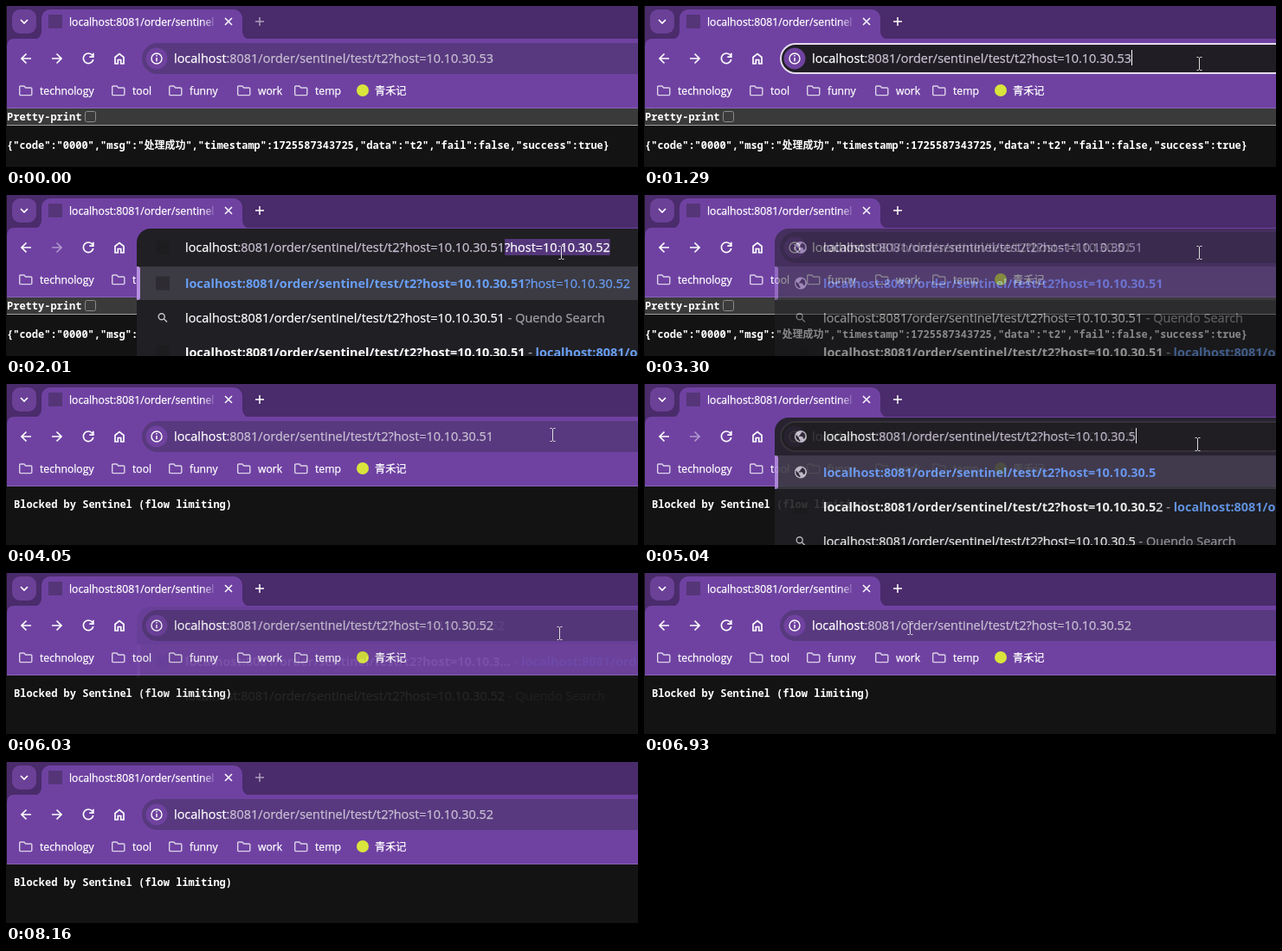
An HTML page that plays this animation: 730x187 px, repeating every 8.22 s.

```html
<!DOCTYPE html>
<html lang="en">
<head>
<meta charset="utf-8">
<title>Browser address bar</title>
<style>
  html, body { margin: 0; width: 100%; height: 100%; overflow: hidden; background: #131313; }
  svg { display: block; width: 730px; height: 187px; }
  text { white-space: pre; --ink: #fff; font: 14.45px "Open Sans", "Noto Sans", sans-serif; }
  text, tspan { fill: var(--ink); stroke: var(--ink); stroke-width: .25; }
  .small { font-size: 12.2px; }
  .cjk { font-family: "Noto Sans CJK SC", "Noto Sans CJK", sans-serif; }
  .mono { font: 700 12px "Noto Sans Mono", "Noto Sans CJK SC", monospace; stroke: none; }
  .line { fill: none; stroke: #fff; stroke-width: 1.7; }
  .path { --ink: #c9c0d4; }
  .muted { --ink: #a3a0a8; }
  .bold { font-weight: 700; stroke: none; }
  .blue { --ink: #699ff5; }
</style>
</head>
<body>
<svg viewBox="0 0 730 187">
  <defs>
    <linearGradient id="titleFade" gradientUnits="userSpaceOnUse" x1="226" x2="243" y1="0" y2="0">
      <stop stop-color="#fff"/><stop offset="1" stop-color="#fff" stop-opacity="0"/>
    </linearGradient>
    <g id="folder"><path class="line" style="stroke:#ddd3e8;stroke-width:1.4" d="M1.7 1h4.2l1.8 2h6.1q1 0 1 1v6.6q0 1-1 1H1.7q-1 0-1-1V2q0-1 1-1z"/></g>
    <g id="tile"><rect x="-8" y="-8" width="16" height="16" fill="#19181b" opacity=".4"/></g>
    <g id="globe">
      <circle r="7" fill="#c9c7cc"/>
      <path fill="#2a282e" d="M-5.4-2L-1.8 1.6v1.3l1.2 1.2v1.6C-4 5.3-6.4 1.6-5.4-2zM1.2-5.4v1.1L-.6-2.8v1.5h-1.5V0h4.2l.8 2.2 1.5.3C6.5-.8 5-4.3 1.2-5.4z"/>
    </g>
    <g id="search" fill="none" stroke="#c9c7cc" stroke-width="1.4">
      <circle cx="-1.3" cy="-1.3" r="3.5"/><path d="M1.3 1.3L5 5"/>
    </g>
  </defs>

  <!-- tab strip -->
  <rect x="1" width="729" height="60" fill="#4a2b6b"/>
  <rect x="7" y="4" width="28" height="28" rx="9" fill="#6b4097"/>
  <path class="line" d="M17 16l4 4 4-4"/>
  <path fill="#6f42a2" d="M32 39a9 9 0 0 0 9-9V14a10 10 0 0 1 10-10H263a10 10 0 0 1 10 10V30a9 9 0 0 0 9 9z"/>
  <rect id="favicon" x="49" y="10" width="16" height="16" fill="#553578"/>
  <path id="spinner" class="line" d="M57 11a7 7 0 1 1-7 7"/>
  <text x="73" y="22.5" style="font-size:12.2px;--ink:url(#titleFade)">localhost:8081/order/sentinel</text>
  <path class="line" style="stroke-width:1.5" d="M253 14l8 8m0-8l-8 8"/>
  <path id="plus" class="line" style="stroke-width:1.5" d="M293 13v10m-5-5h10"/>

  <!-- toolbar -->
  <path fill="#6f42a2" d="M1 119V47q0-9 9-9H730V119z"/>
  <rect x="1" y="118" width="729" height="1" fill="#8b62b9"/>
  <circle id="hover" cx="95" cy="61" r="15" fill="#8a63b5"/>
  <path class="line" d="M29 61H18m5.5-5.5L18 61l5.5 5.5"/>
  <path id="forward" class="line" d="M53 61h11m-5.5-5.5L64 61l-5.5 5.5"/>
  <path id="reload" class="line" d="M99.9 57.5A5.8 5.8 0 1 0 100.8 62M100.8 54.8v4.4h-4.5"/>
  <path id="stop" class="line" d="M90 56l10 10m0-10L90 66"/>
  <path class="line" d="M126 59.5v7.5h3.3V62.5h3.4v4.500h3.300V59.5l-5-4z"/>
  <rect x="157" y="43" width="620" height="36" rx="18" fill="#58397f"/>
  <rect id="focus" x="158" y="44" width="620" height="34" rx="17" fill="#201e24" stroke="#e6dcf1" stroke-width="2"/>
  <circle cx="174" cy="61" r="12.5" fill="#6f429f"/>
  <circle class="line" cx="174" cy="61" r="6" style="stroke-width:1.4"/>
  <path class="line" style="stroke-width:1.5" d="M174 60v4.3m0-7.3v1.5"/>
  <text id="url" x="194" y="66"></text>
  <rect id="caret" y="51" width="1" height="18" fill="#fff"/>
  <g id="bookmarks"></g>
  <circle cx="412" cy="98" r="7" fill="#d9e53c"/>
  <text class="small cjk" x="426" y="103">青禾记</text>

  <!-- page -->
  <rect y="119" width="730" height="68" fill="#131313"/>
  <g id="json">
    <rect x="1" y="119" width="729" height="19" fill="#3a3a3a"/>
    <rect x="1" y="138" width="729" height="1" fill="#a0a0a0"/>
    <text class="mono" x="1" y="133">Pretty-print</text>
    <rect x="91.5" y="122.5" width="12" height="12" rx="2" fill="#3b3b3b" stroke="#8b8b8b"/>
    <text class="mono" x="1" y="166">{"code":"0000","msg":"处理成功","timestamp":1725587343725,"data":"t2","fail":false,"success":true}</text>
  </g>
  <text id="blocked" class="mono" x="9" y="144">Blocked by Sentinel (flow limiting)</text>

  <!-- suggestions -->
  <g id="popup">
    <rect id="sheet" x="151" y="39" width="620" rx="16" fill="#201f23"/>
    <rect x="151" y="83" width="579" height="39" fill="#3c3a43"/>
    <path fill="#b58ee0" d="M151 83h1q3 0 3 3v33q0 3-3 3h-1z"/>
    <rect id="selection" y="51" height="19" fill="#54377b"/>
    <use id="inputIcon" x="181" y="61"/>
    <text id="input" x="207" y="66"></text>
    <rect id="inputCaret" y="51" width="1" height="18" fill="#fff"/>
    <g id="rows"></g>
  </g>

  <path id="beam" class="line" style="stroke:#dcdcdc;stroke-width:1" d="M-3-7.500h2L0-6.500 1-7.500h2M0-7V7M-3 7.500h2L0 6.500 1 7.500h2"/>
  <path id="arrow" fill="#fff" stroke="#222" stroke-width=".8" d="M0 0v15l3.5-3.3 2.3 5.3 2.3-1-2.3-5.2h4.7z"/>
</svg>
<script>
const LOOP = 8220;
const HOST = 'localhost';
const PATH = ':8081/order/sentinel/test/t2';
const query = end => '?host=10.10.30.' + end;
const address = end => HOST + PATH + query(end);
const $ = id => document.getElementById(id);

const span = (text, cls = '') => `<tspan class="${cls}">${text}</tspan>`;
const addressSpans = end => span(HOST) + span(PATH + query(end), 'path');
const link = text => span(text, 'bold blue');
const dash = span(' - ', 'muted');
const searchRow = end => ['search', span(address(end)) + span(' - Quendo Search', 'muted')];
const historyRow = (...title) => ['tile', title.join('') + dash + link(address('52'))];

const partial = {
  end: '5', icon: 'globe', height: 200,
  rows: [['globe', link(address('5'))],
         historyRow(span(address('5'), 'bold'), span('2')),
         searchRow('5')]
};
const completed = {
  end: '51', tail: query('52'), icon: 'tile', height: 200,
  rows: [['tile', link(address('51')) + span(query('52'), 'blue')],
         searchRow('51'),
         historyRow(span(address('51'), 'bold'))]
};
const trimmed = {
  ...completed, tail: '', icon: 'globe',
  rows: [['globe', link(address('51'))], ...completed.rows.slice(1)]
};
const retyped = {
  end: '52', icon: 'tile', height: 132,
  rows: [historyRow(span(address('52').slice(0, -4) + '...', 'bold')), searchRow('52')]
};

const popupStates = [[0, partial], [2010, completed], [2610, trimmed], [4980, partial], [5280, retyped]];
const urls = [[0, '53'], [3300, '51'], [6000, '52']];
const mouse = [
  [90, 704, 51], [300, 582, 68], [450, 606, 62], [1200, 606, 62], [1290, 641, 67],
  [3840, 641, 67], [4050, 631, 59], [4200, 631, 59], [4410, 639, 70],
  [6450, 639, 70], [7290, 93, 60], [8070, 93, 60], [8160, 50, 187]
];

const between = (t, a, b) => t >= a && t < b;
const ramp = (t, a, b) => Math.min(1, Math.max(0, (t - a) / (b - a)));
const latest = (list, t) => list.reduce((value, [at, v]) => t >= at ? v : value, null);
const show = (id, on) => { $(id).style.display = on ? '' : 'none'; };

function mouseAt(t) {
  const next = mouse.findIndex(([at]) => at > t);
  if (next < 1) return null;
  const [t0, x0, y0] = mouse[next - 1], [t1, x1, y1] = mouse[next];
  const u = ramp(t, t0, t1), k = u * u * (3 - 2 * u);
  return [x0 + (x1 - x0) * k, y0 + (y1 - y0) * k];
}

let shownPopup, shownUrl;

function setUrl(end) {
  if (end === shownUrl) return;
  shownUrl = end;
  $('url').innerHTML = addressSpans(end);
  $('caret').setAttribute('x', Math.round(194 + $('url').getComputedTextLength()));
}

function setPopup(state) {
  if (state === shownPopup) return;
  shownPopup = state;
  const { end, tail = '', icon, height, rows } = state;
  $('sheet').setAttribute('height', height);
  $('inputIcon').setAttribute('href', '#' + icon);
  $('input').innerHTML = addressSpans(end);
  const typed = $('input').getComputedTextLength();
  $('inputCaret').setAttribute('x', Math.round(207 + typed));
  $('input').innerHTML += span(tail);
  $('selection').setAttribute('x', 207 + typed);
  $('selection').setAttribute('width', $('input').getComputedTextLength() - typed);
  $('rows').innerHTML = rows.map(([glyph, content], i) =>
    `<use href="#${glyph}" x="181" y="${102.5 + 40 * i}"/><text x="207" y="${107.5 + 40 * i}">${content}</text>`
  ).join('');
}

function draw(t) {
  setUrl(latest(urls, t));
  const focused = between(t, 810, 3300) || between(t, 4230, 6000);
  const focusStart = t < 3300 ? 810 : 4230;
  $('focus').style.opacity = focused ? ramp(t, focusStart, focusStart + 120) : 0;
  show('caret', focused && t >= focusStart + 120);

  const fade = (start, end) => ramp(t, start - 30, start + 72) * (1 - ramp(t, end - 30, end + 36));
  const opacity = Math.max(fade(1590, 3300), fade(4980, 6000));
  show('popup', opacity > 0);
  $('popup').style.opacity = opacity;
  if (opacity > 0) setPopup(latest(popupStates, t));
  const blinkOff = between(t, 3090, 3500) || between(t, 5790, 6200);
  show('inputCaret', !between(t, 2010, 2610) && !blinkOff);

  show('json', t < 3390);
  show('blocked', t >= 3390);

  const loading = between(t, 7320, 7710);
  show('favicon', !loading);
  show('spinner', loading);
  $('spinner').setAttribute('transform', `rotate(${t * .36 % 360} 57 18)`);
  show('reload', !loading);
  show('stop', loading);
  const active = between(t, 840, 8100);
  $('plus').style.opacity = active ? 1 : .55;
  $('forward').style.opacity = between(t, 1590, 3300) || between(t, 4980, 6000) ? .45 : 1;

  const pos = mouseAt(t);
  const overBar = pos && pos[0] > 157;
  show('beam', overBar);
  show('arrow', pos && !overBar);
  show('hover', pos && Math.hypot(pos[0] - 95, pos[1] - 61) < 15);
  if (pos) {
    const [x, y] = pos.map(Math.round);
    $(overBar ? 'beam' : 'arrow').setAttribute('transform', `translate(${x + .5} ${y})`);
  }
}

[['technology', 15], ['tool', 122], ['funny', 188], ['work', 267], ['temp', 333]].forEach(([name, x]) => {
  $('bookmarks').innerHTML += `<use href="#folder" x="${x}" y="92"/><text class="small" x="${x + 24}" y="103">${name}</text>`;
});

const start = performance.now();
function tick() {
  draw((performance.now() - start) % LOOP);
  requestAnimationFrame(tick);
}
tick();
</script>
</body>
</html>
```
